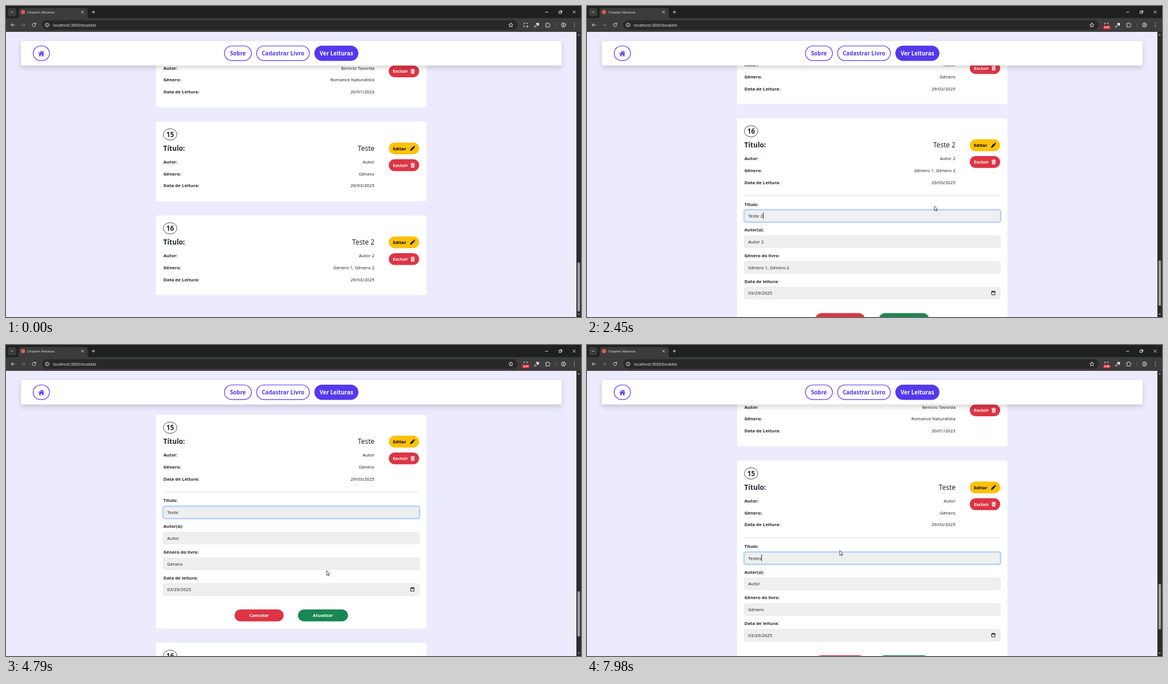
Write an HTML page that moves like this. It is 1000 px wide and 541 px high and loops after 8000 ms.

```html
<!DOCTYPE html>
<html lang="pt">
<head>
<meta charset="utf-8">
<title>Chapter Almanac</title>
<style>
html, body { margin: 0; width: 100%; height: 100%; overflow: hidden; background: #ecebfe; }
svg { display: block; width: 100vw; height: 100vh; }
text { font-family: "Noto Sans", "Open Sans", sans-serif; font-size: 7.83px; fill: #212529; white-space: pre; }
.line { fill: none; stroke: #d5d5d5; stroke-width: 1; stroke-linecap: round; stroke-linejoin: round; }
#bar { filter: drop-shadow(0 4px 4px rgba(0, 0, 0, .16)); }
</style>
</head>
<body>
<svg id="stage" viewBox="0 0 1000 541"></svg>
<script>
const LOOP = 8000;
const PURPLE = '#5638ee', RED = '#dc3545', YELLOW = '#ffc107', GREEN = '#198754', LAVENDER = '#ecebfe';

// ---- drawing helpers ----
const rect = (x, y, w, h, r, fill, extra = '') =>
  `<rect x="${x}" y="${y}" width="${w}" height="${h}" rx="${r}" fill="${fill}" ${extra}/>`;
const path = (d, extra = 'class="line"') => `<path d="${d}" ${extra}/>`;
// y is the middle of the capitals
const text = (x, y, string, { size = 7.83, weight = 400, fill = '#212529', anchor = 'start', extra = '' } = {}) =>
  `<text x="${x}" y="${y + size * .36}" text-anchor="${anchor}" style="font-size:${size}px;font-weight:${weight};fill:${fill}" ${extra}>${string}</text>`;
const bold = (x, y, string, options) => text(x, y, string, { weight: 700, ...options });
const at = (x, y, content) => `<g transform="translate(${x} ${y})">${content}</g>`;

const pencil = path('M0 9 .9 6 5.2 1.7 7.3 3.8 3 8.1ZM5.8 1.1 6.6.3Q7 0 7.4.3L8.7 1.6Q9 2 8.7 2.4L7.9 3.2Z', 'fill="#000"');
const trash = path('M0 1.2H2.2L2.8.3H4.6L5.2 1.2H7.4V2.2H0ZM.6 2.8H6.8L6.4 8.8H1Z', 'fill="#fff"') +
  path('M2.5 3.8V7.8M3.7 3.8V7.8M4.9 3.8V7.8', `stroke="${RED}" stroke-width=".5"`);
const calendar = path('M.5 1.3H6.5V7H.5ZM2 .2V1.3M5 .2V1.3', 'fill="none" stroke="#111" stroke-width=".9"') +
  rect(.5, 1, 6, 1.6, 0, '#111');

// ---- book cards ----
const CLOSED = 138.4, OPENED = 371.9, PITCH = 163.3;

function field(i, label, value) {
  const y = 159.6 + i * 44.7;
  const ring = i ? '' : rect(272.6, y - 1, 447.2, 22.4, 4, 'none', 'stroke="#c2dbfe" stroke-width="2"');
  return text(273.7, y - 10.3, label, { weight: 600, size: 7.75 }) + ring +
    rect(273.6, y, 445, 20.4, 3, '#efefef', `stroke="${i ? '#dcdfe3' : '#86b7fe'}" stroke-width=".7"`) +
    text(280.3, y + 10.3, value, { extra: i ? '' : 'class="entry"' });
}

function card({ number, title, author, genre, date, input }) {
  const rows = [['Autor:', author], ['Gênero:', genre], ['Data de Leitura:', date]];
  return `<g id="card${number}">` +
    rect(261, 0, 470.2, CLOSED, 3.5, '#fff', 'class="panel"') +
    `<ellipse cx="285.4" cy="22.4" rx="11.8" ry="9.9" fill="none" stroke="#212529" stroke-width=".8"/>` +
    bold(285.4, 22.6, number, { size: 11.8, anchor: 'middle' }) +
    bold(273.6, 46.4, 'Título:', { size: 11.8 }) +
    text(640.8, 46.4, title, { size: 11.8, anchor: 'end' }) +
    rows.map(([label, value], i) => bold(273.7, 70 + i * 20.8, label) +
      text(640.8, 70 + i * 20.8, value, { anchor: 'end' })).join('') +
    rect(665.6, 36.4, 53, 20.6, 10.3, YELLOW, 'class="edit"') +
    bold(672.7, 46.8, 'Editar', { fill: '#000' }) + at(702.6, 42.2, pencil) +
    rect(665.6, 65.6, 53, 20.6, 10.3, RED) +
    bold(672.7, 75.9, 'Excluir', { fill: '#fff' }) + at(703.6, 71.3, trash) +
    '<g class="form">' +
      rect(273.6, 134.2, 445, .6, 0, '#c9cacc') +
      field(0, 'Título:', title) + field(1, 'Autor(a):', author) +
      field(2, 'Gênero do livro:', genre) + field(3, 'Data de leitura:', input) +
      at(703.2, 299.8, calendar) +
      rect(280, 163.6, .8, 11.6, 0, '#000', 'class="caret"') +
      rect(397.4, 338.7, 85.6, 20.6, 10.3, RED, 'class="cancel"') +
      bold(440.2, 349, 'Cancelar', { fill: '#fff', anchor: 'middle' }) +
      rect(507.8, 338.7, 87, 20.6, 10.3, GREEN) +
      bold(551.3, 349, 'Atualizar', { fill: '#fff', anchor: 'middle' }) +
    '</g></g>';
}

const books = [
  { number: 14, title: 'O Bambual', author: 'Benício Tavorda', genre: 'Romance Naturalista', date: '20/01/2023', input: '01/20/2023' },
  { number: 15, title: 'Teste', author: 'Autor', genre: 'Gênero', date: '29/03/2025', input: '03/29/2025' },
  { number: 16, title: 'Teste 2', author: 'Autor 2', genre: 'Gênero 1, Gênero 2', date: '29/03/2025', input: '03/29/2025' }
];

// ---- navigation bar and browser frame ----
function navButton(x, w, label, active) {
  return rect(x, 69.5, w, 25.4, 12.7, active ? PURPLE : '#fff', `stroke="${PURPLE}" stroke-width="1.2"`) +
    bold(x + w / 2, 82.6, label, { size: 9.7, anchor: 'middle', fill: active ? '#fff' : PURPLE });
}

const navigation = rect(0, 45, 992, 58, 0, LAVENDER) +
  rect(26, 61, 940.3, 42.5, 2.5, '#fff', 'id="bar"') +
  navButton(47.3, 28.3, '') +
  path('M56 82.8 61.5 77.8 63.6 79.7V78.3H65V81L67 82.8 66.2 83.5 61.5 79.2 56.8 83.5ZM57.7 83.5 61.5 80.1 65.3 83.5V87.4H62.7V84.6H60.3V87.4H57.7Z', `fill="${PURPLE}"`) +
  navButton(380, 46.8, 'Sobre') + navButton(435.8, 91.8, 'Cadastrar Livro') + navButton(536.9, 75.3, 'Ver Leituras', true);

const chrome = rect(0, 0, 1000, 22, 0, '#1f2020') +
  rect(3, 3.5, 15, 14.5, 4, '#3a3b3b') + path('M8.5 9.8 10.5 11.8 12.5 9.8') +
  path('M18 22Q22 21 22 17V8Q22 3.5 26 3.5H138Q142 3.5 142 8V17Q142 21 146 22Z', 'fill="#3c3c3c"') +
  rect(0, 21, 1000, 24, 0, '#3c3c3c') +
  '<circle cx="29.5" cy="10.7" r="3.6" fill="#d9604f"/>' +
  text(37, 10.9, 'Chapter Almanac', { size: 5.9, fill: '#e6e6e6' }) +
  path('M131.3 8.7 135 12.4M135 8.7 131.3 12.4M149.5 10.6H154.5M152 8.1V13.1') +
  path('M938 10.8H942.5M985.8 8.3 990.4 12.9M990.4 8.3 985.8 12.9M962 9.4H965.6V13H962ZM963.4 9.2V8.1H966.9V11.6H965.8') +
  path('M15 33H9M11.7 30.2 9 33 11.7 35.8') +
  path('M27 33H33M30.3 30.2 33 33 30.3 35.8', 'class="line" style="stroke:#777"') +
  path('M51.3 31.2A3 3 0 1 0 51.8 33.5M51.9 29.5V31.7H49.7') +
  rect(63, 24.8, 827, 16.7, 8.3, '#282828') +
  '<circle cx="71.5" cy="33" r="3.3" class="line"/>' + path('M71.5 32.8V34.8M71.5 31.2V31.3') +
  text(81.7, 33.2, 'localhost:3000/booklist', { size: 6.9, fill: '#e3e3e3' }) +
  path('M878 29.4 879.1 31.9 881.7 32.2 879.7 33.9 880.3 36.5 878 35.1 875.7 36.5 876.3 33.9 874.3 32.2 876.9 31.9Z') +
  path('M900.5 31.5V29.7H902.3M905 29.7H906.8V31.5M900.5 34V35.8H902.3M905.2 35.8H908M906.6 34.4V37.2') +
  `<g id="badge">${rect(897.8, 34, 12.4, 6.4, 1.2, '#e0141e')}${bold(904, 37.3, '0:00', { size: 4.7, fill: '#fff', anchor: 'middle', extra: 'id="timer"' })}</g>` +
  path('M919.3 36.6 919.8 34.8 923.3 31.3 924.9 32.9 921.3 36.3Z') + path('M923 30.4 926 33.3M924.6 31.6 926 30.2', 'class="line" style="stroke-width:2;stroke:#fff"') +
  path('M938.8 30.6H940.6Q940.6 29 941.8 29T943 30.6H945V32.4Q946.4 32.4 946.4 33.5T945 34.7V36.5H938.8V34.7Q940.2 34.6 940.2 33.5T938.8 32.4Z') +
  rect(955.6, 29, .8, 8, 0, '#66686b') +
  '<circle cx="969.6" cy="33" r="3.7" class="line"/><circle cx="969.6" cy="32" r="1.2" class="line"/>' + path('M967.2 35.4Q969.6 33.4 972 35.4') +
  path('M988.5 30V30M988.5 33V33M988.5 36V36', 'class="line" style="stroke-width:1.4"');

const scrollbar = rect(992, 45, 8, 496, 0, '#2c2c2c') +
  path('M994 51.3 996 48.5 998 51.3ZM994 535 996 537.8 998 535Z', 'fill="#a0a0a0"') +
  rect(993.9, 446, 4.4, 85, 2.2, '#9f9f9f', 'id="thumb"');

const pointers = '<g id="pointer" stroke="#111" stroke-width=".7" stroke-linejoin="round" fill="#fff">' +
  path('M0 0V8.2L1.8 6.6 3 9.2 4.2 8.6 3.1 6.2H5.6Z', 'id="arrow"') +
  path('M0 .6Q.9-.4 1.7.6V4L5 4.7Q6 5 5.9 6.2L5.3 9.2Q5 10.7 4 10.7H1Q0 10.5-.7 9.2L-2.6 6.6Q-2.5 5.4-1.2 5.9L0 7Z', 'id="hand"') + '</g>';

stage.innerHTML = rect(0, 0, 1000, 541, 0, LAVENDER) + books.map(card).join('') + navigation + chrome + scrollbar + pointers;

// ---- motion ----
const scrollKeys = [[0, 0], [1162, 0], [1750, 233.6], [2210, 233.6], [2950, -26.4], [4100, -26.4],
  [4320, 26], [4530, 26], [4780, 79.6], [6450, 79.6], [6450, 0]];
const pointerKeys = [[100, 760, 470], [390, 700, 425], [540, 688.8, 412], [1800, 688.8, 412], [2050, 580.5, 369.5],
  [2230, 580.5, 369.5], [2950, 686, 272.5], [3300, 686, 272.5], [3790, 600, 375], [4300, 557.7, 392.5],
  [5310, 557.7, 392.5], [6110, 500, 432], [6300, 453.5, 472], [6700, 453.5, 472], [7130, 690, 243],
  [7420, 690, 243], [7850, 439.7, 357.5]];
const edits = [{ from: 0 }, { from: 990, number: 16 }, { from: 3160, number: 15 }, { from: 6450 }, { from: 7300, number: 15 }];
const TYPED = 7920;

const within = (t, a, b) => t >= a && t < b;

function track(keys, t) {
  const i = keys.findLastIndex(key => key[0] <= t);
  if (i < 0) return keys[0].slice(1);
  const a = keys[i], b = keys[i + 1];
  if (!b) return a.slice(1);
  const u = (t - a[0]) / (b[0] - a[0]), eased = u * u * (3 - 2 * u);
  return a.slice(1).map((value, k) => value + (b[k + 1] - value) * eased);
}

const cards = books.map(({ number, title }) => {
  const group = document.getElementById('card' + number);
  const part = name => group.querySelector('.' + name);
  return { number, title, group, panel: part('panel'), edit: part('edit'), form: part('form'),
    entry: part('entry'), caret: part('caret'), cancel: part('cancel') };
});
const [badge, timer, thumb, pointer, arrow, hand] =
  ['badge', 'timer', 'thumb', 'pointer', 'arrow', 'hand'].map(id => document.getElementById(id));
const show = (element, visible) => element.setAttribute('display', visible ? 'inline' : 'none');

function draw(t) {
  const [scroll] = track(scrollKeys, t);
  const editing = edits.findLast(edit => edit.from <= t);
  const typed = t >= TYPED;
  const caretAge = t - (typed ? TYPED : editing.from);
  const hovered = within(t, 500, 1290) ? 16 : within(t, 2900, 3390) || within(t, 7090, 7500) ? 15 : 0;
  const onCancel = within(t, 6220, 6740);

  let y = 201 - PITCH - scroll;
  for (const item of cards) {
    const open = item.number === editing.number;
    item.group.setAttribute('transform', `translate(0 ${y})`);
    item.panel.setAttribute('height', open ? OPENED : CLOSED);
    item.edit.setAttribute('fill', item.number === hovered ? '#ffca2c' : YELLOW);
    item.cancel.setAttribute('fill', onCancel ? '#bb2d3b' : RED);
    show(item.form, open);
    if (open) {
      item.entry.textContent = item.title + (typed ? 's' : '');
      item.caret.setAttribute('x', 280.3 + item.entry.getComputedTextLength());
      show(item.caret, caretAge % 1060 < 530);
    }
    y += PITCH + (open ? OPENED - CLOSED : 0);
  }

  thumb.setAttribute('y', (editing.number ? 415.6 : 446) + .16 * scroll);
  thumb.setAttribute('height', editing.number ? 79 : 85.5);
  show(badge, t >= 100);
  timer.textContent = '0:0' + Math.floor((t + 30) / 1000);

  show(pointer, t >= 290);
  pointer.setAttribute('transform', `translate(${track(pointerKeys, t).join(' ')})`);
  show(hand, hovered || onCancel);
  show(arrow, !hovered && !onCancel);
}

const start = performance.now();
function tick() {
  draw((performance.now() - start) % LOOP);
  requestAnimationFrame(tick);
}
tick();
</script>
</body>
</html>
```
